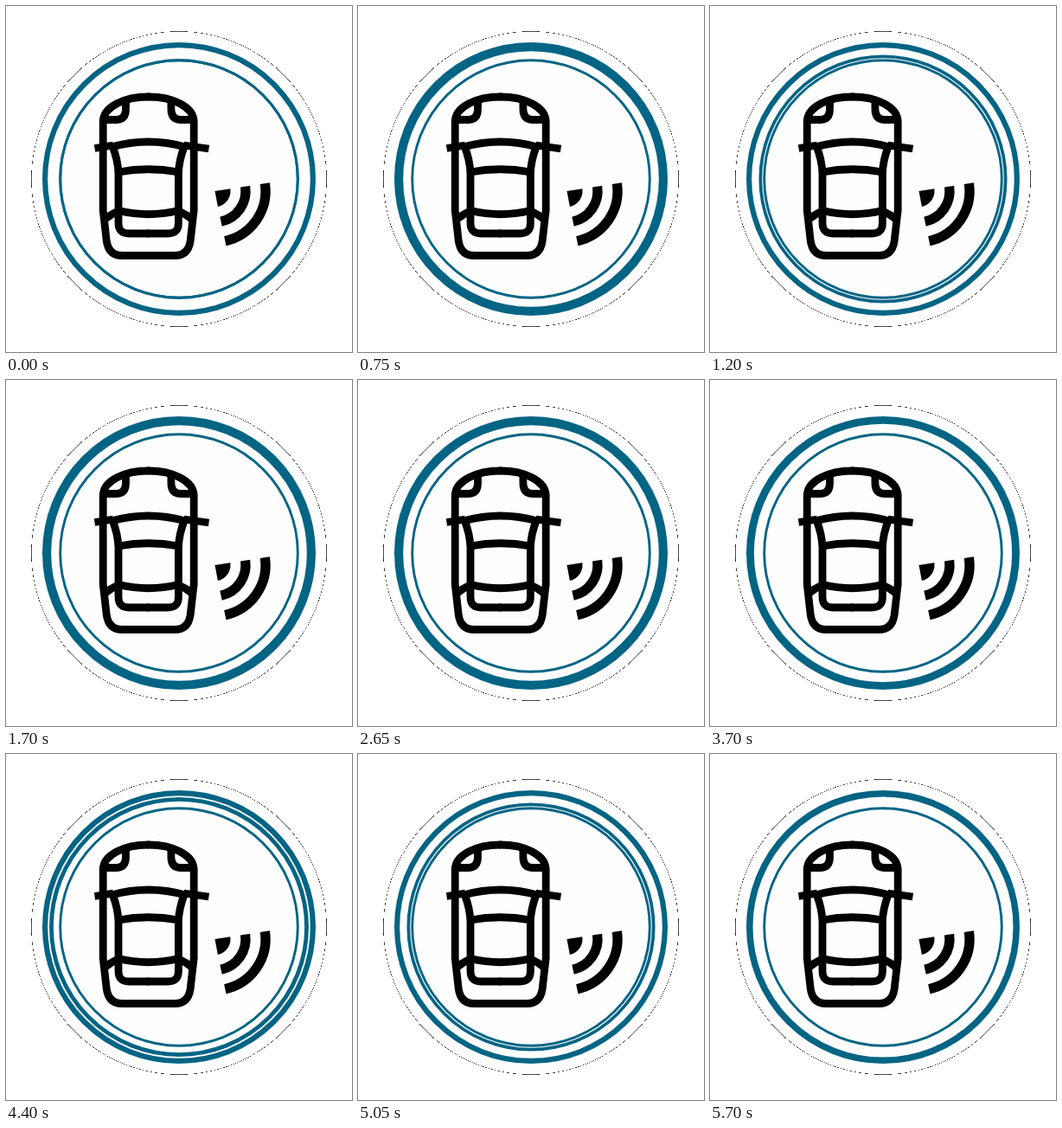
Animation, 400 px wide and 400 px high, one loop 5750 ms. Source, as an HTML page with a canvas:

```html
<!DOCTYPE html>
<html lang="en">
<head>
<meta charset="utf-8">
<title>Parking sensor</title>
<style>
html, body { margin: 0; width: 100%; height: 100%; overflow: hidden; background: #fff; }
canvas { display: block; width: 400px; height: 400px; }
</style>
</head>
<body>
<canvas id="stage" width="400" height="400"></canvas>
<script>
const LOOP = 5750, STEP = 80, STEPS = 12;
const C = 200, DISC = 170.6;
const TEAL = '#046484';
const INNER = { r: 137.3, w: 2.9 };
const OUTER = { r: 154.9, w: 6.2 };

const ctx = document.getElementById('stage').getContext('2d');
const backdrop = document.createElement('canvas');
backdrop.width = backdrop.height = 400;

function ring(g, { r, w }) {
  g.strokeStyle = TEAL;
  g.lineWidth = w;
  g.beginPath();
  g.arc(C, C, r, 0, Math.PI * 2);
  g.stroke();
}

// Thin jagged pixel edge around the badge
function discEdge(g) {
  for (let y = 0; y < 400; y++) {
    for (let x = 0; x < 400; x++) {
      const cover = DISC + 0.5 - Math.hypot(x + 0.5 - C, y + 0.5 - C);
      if (cover < 0.3 || cover > 0.7) continue;
      const v = Math.round(200 * cover - 40);
      g.fillStyle = `rgb(${v},${v},${v})`;
      g.fillRect(x, y, 1, 1);
    }
  }
}

function stroke(g, d) {
  g.stroke(new Path2D(d));
}

function mirrored(g, d) {
  stroke(g, d);
  g.save();
  g.translate(329.4, 0);
  g.scale(-1, 1);
  stroke(g, d);
  g.restore();
}

function car(g) {
  g.strokeStyle = '#000';
  g.lineJoin = 'round';
  g.lineWidth = 8.8;
  // body
  mirrored(g, 'M166 105 H164 C138 105 112.2 116 112.2 134 V236 L116.3 272 Q119 288.5 134 288.5 H166');
  // headlight
  mirrored(g, 'M112 131.5 H128 Q138.5 131 138.5 119 V110');
  // pillar and cabin
  mirrored(g, 'M123 162 Q129.5 178 130 194 V251 Q130 263 142 263 H166');
  // rear corner
  mirrored(g, 'M113 247.5 Q121 241 130.5 236.5');
  // side mirrors
  stroke(g, 'M102.5 164.5 L124 161');
  stroke(g, 'M205.5 161 L234.5 165');
  // glass
  stroke(g, 'M122 163 Q164.7 151 207.4 163');
  stroke(g, 'M130 192 Q164.7 185.5 199.4 192');
  stroke(g, 'M130 236.5 Q164.7 245 199.4 236.5');
}

function signal(g) {
  const from = -0.15, to = 1.36;
  g.lineWidth = 11.3;
  for (const r of [36, 59]) {
    g.beginPath();
    g.arc(241, 214, r, from, to);
    g.stroke();
  }
  g.fillStyle = '#000';
  g.beginPath();
  g.moveTo(241.5, 214);
  g.arc(241, 214, 18.5, from, to);
  g.fill();
}

function build(g) {
  g.fillStyle = '#fff';
  g.fillRect(0, 0, 400, 400);
  g.fillStyle = '#fefefe';
  g.beginPath();
  g.arc(C, C, DISC, 0, Math.PI * 2);
  g.fill();
  discEdge(g);
  ring(g, INNER);
  ring(g, OUTER);
  car(g);
  signal(g);
}

// A pulse grows from the thin ring into the thick one
function draw(ms) {
  const k = Math.floor((ms % LOOP) / STEP) % STEPS / STEPS;
  ctx.drawImage(backdrop, 0, 0);
  ring(ctx, {
    r: INNER.r + (OUTER.r - INNER.r) * k,
    w: INNER.w + (OUTER.w - INNER.w) * k
  });
}

build(backdrop.getContext('2d'));
const start = performance.now();
function tick() {
  draw(performance.now() - start);
  requestAnimationFrame(tick);
}
tick();
</script>
</body>
</html>
```
